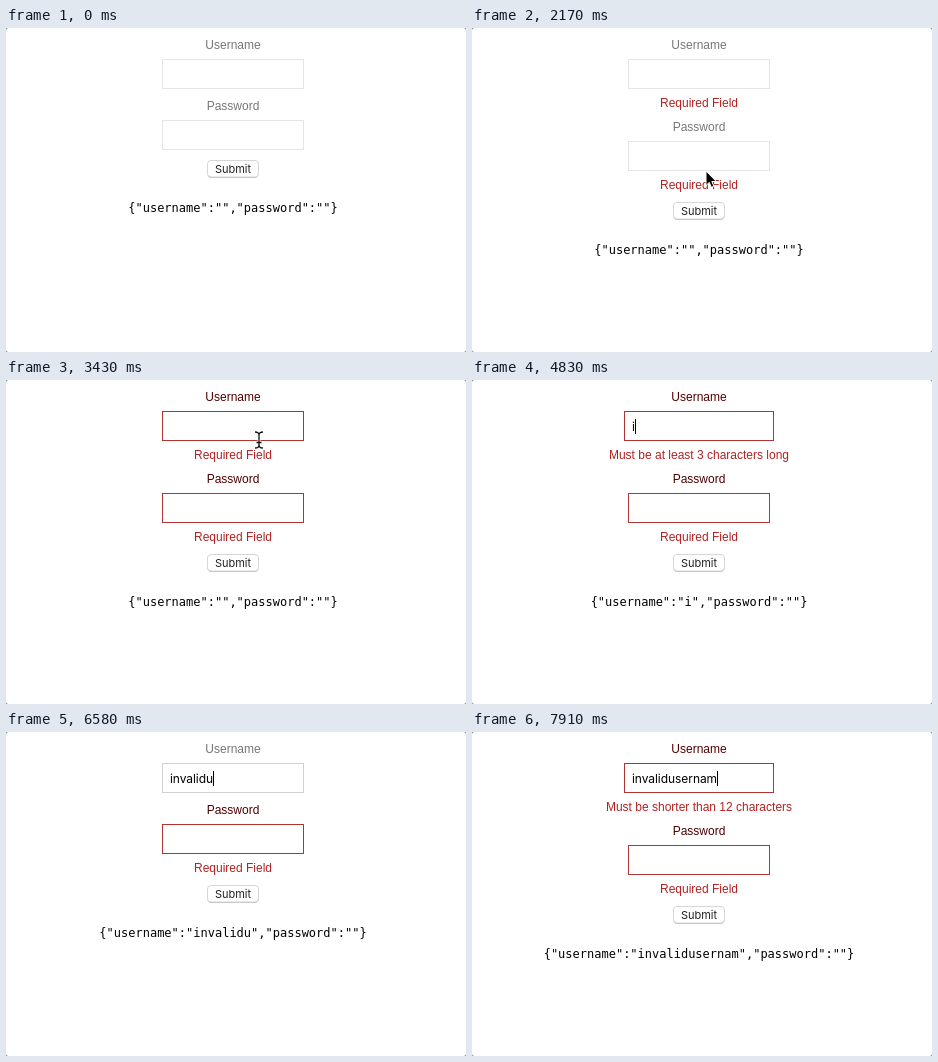
An HTML page for the animation above (8000 ms loop, 460 by 324 pixels).

```html
<!DOCTYPE html>
<html lang="en">
<head>
<meta charset="utf-8">
<title>Form validation</title>
<style>
  html, body { margin: 0; width: 100%; height: 100%; overflow: hidden; background: #777; }
  svg { display: block; width: 460px; height: 324px; }
  text { font: 12px "Liberation Sans", Arial, sans-serif; text-anchor: middle; white-space: pre; }
  .error { fill: #b22222; }
  .json { font-family: "DejaVu Sans Mono", monospace; fill: #000; }
  .value { font-family: Inter, sans-serif; letter-spacing: -.06px; text-anchor: start; fill: #000; }
  .button { font: 11px Inter, sans-serif; fill: #222; }
  .box { fill: #fff; shape-rendering: crispEdges; }
</style>
</head>
<body>
<svg viewBox="0 0 460 324">
  <rect width="460" height="324" rx="2.5" fill="#fff"/>
  <g id="user">
    <text class="label" x="227" y="21">Username</text>
    <rect class="box" x="156.5" y="31.5" width="141" height="29"/>
    <text class="error" x="227" y="79"></text>
    <text class="value" y="51"></text>
    <rect id="caret" y="39" width="1" height="15"/>
  </g>
  <g id="pass">
    <text class="label" x="227" y="82">Password</text>
    <rect class="box" x="156.5" y="92.5" width="141" height="29"/>
    <text class="error" x="227" y="140">Required Field</text>
  </g>
  <g id="foot">
    <rect x="201.5" y="133" width="51" height="17" rx="4" fill="#bbb"/>
    <rect x="201.5" y="132.5" width="51" height="16.5" rx="3.5" fill="#fff" stroke="#d6d6d6"/>
    <text class="button" x="227" y="145">Submit</text>
    <text class="json" x="227" y="184"></text>
  </g>
  <g id="pointer">
    <path id="arrow" d="M0 0V14.5L3.3 11.4L5.4 16.3L7.9 15.2L5.8 10.5H10.3Z" stroke="#fff" stroke-width="1"/>
    <g id="beam" fill="none">
      <path id="beamShape" d="M-4-8Q0-8 0-5V5Q0 8-4 8M4-8Q0-8 0-5M0 5Q0 8 4 8M-2.5 2.5H2.5" stroke="#fff" stroke-width="2.6"/>
      <use href="#beamShape"/>
      <path d="M-4-8Q0-8 0-5V5Q0 8-4 8M4-8Q0-8 0-5M0 5Q0 8 4 8M-2.5 2.5H2.5" stroke="#111" stroke-width="1.3"/>
    </g>
  </g>
</svg>
<script>
const LOOP = 8000, ROW = 21, FADE = 200;
const SUBMIT = 2170, FOCUS = 3920, VALID = 5320, TOO_LONG = 7630;
const NAME = 'invalidusernam';
const KEYS = [4760, 5040, 5320, 5740, 6020, 6300, 6440, 6580, 6720, 7140, 7560, 7630, 7770, 7910];
// time, x, y
const PATH = [[560, 246, 296], [1260, 234, 143], [2660, 234, 143],
              [3430, 253, 60], [3500, 254.5, 59.5], [3640, 258.5, 54]];
const GREY = [119, 119, 119], MAROON = [80, 0, 0], RED = [176, 52, 52];
const IDLE = [229, 229, 229], FOCUSED = [208, 208, 208];

const $ = s => document.querySelector(s);
const field = id => ({
  label: $(`#${id} .label`), box: $(`#${id} .box`), error: $(`#${id} .error`)
});
const user = field('user'), pass = field('pass');
const value = $('.value'), caret = $('#caret'), json = $('.json');
const pointer = $('#pointer'), arrow = $('#arrow'), beam = $('#beam');

const clamp = v => Math.max(0, Math.min(1, v));
const ease = v => v * v * (3 - 2 * v);
const lerp = (a, b, k) => a + (b - a) * k;
const mix = (a, b, k) => `rgb(${a.map((v, i) => Math.round(lerp(v, b[i], k)))})`;
const fade = (t, start) => ease(clamp((t - start) / FADE));
const show = (el, on) => el.setAttribute('visibility', on ? 'inherit' : 'hidden');
const shift = (el, x, y) => el.setAttribute('transform', `translate(${x} ${y})`);

function paint({ label, box }, level, idle) {
  label.setAttribute('fill', mix(GREY, MAROON, level));
  box.setAttribute('stroke', mix(idle, RED, level));
}

function pointerAt(t) {
  let i = 0;
  while (i < PATH.length - 2 && t >= PATH[i + 1][0]) i++;
  const [a, b] = [PATH[i], PATH[i + 1]];
  const k = ease(clamp((t - a[0]) / (b[0] - a[0])));
  return [lerp(a[1], b[1], k), lerp(a[2], b[2], k)];
}

function drawPointer(t) {
  const on = t >= PATH[0][0] && t < KEYS[0];
  show(pointer, on);
  if (!on) return;
  const [x, y] = pointerAt(t);
  const overText = t > SUBMIT && (y < 61 || (y > 68 && y < 82) || (y > 113 && y < 142.5));
  shift(pointer, x, y);
  show(arrow, !overText);
  show(beam, overText);
}

function draw(t) {
  const typed = NAME.slice(0, KEYS.filter(k => t >= k).length);
  const passBad = t >= SUBMIT;
  const userBad = passBad && (t < VALID || t >= TOO_LONG);
  const wide = userBad && typed ? 4 : 0;

  const level = t < VALID ? fade(t, SUBMIT) : t < TOO_LONG ? 1 - fade(t, VALID) : fade(t, TOO_LONG);
  paint(user, level, t < FOCUS ? IDLE : FOCUSED);
  paint(pass, fade(t, SUBMIT), IDLE);

  user.box.setAttribute('x', 156.5 - wide);
  user.box.setAttribute('width', 141 + 2 * wide);
  user.error.textContent = !typed ? 'Required Field'
    : t < VALID ? 'Must be at least 3 characters long' : 'Must be shorter than 12 characters';
  show(user.error, userBad);
  show(pass.error, passBad);

  value.textContent = typed;
  value.setAttribute('x', 164 - wide);
  const end = typed ? value.getComputedTextLength() : 0;
  caret.setAttribute('x', Math.round(164 - wide + end));
  show(caret, typed || (t >= FOCUS && t < FOCUS + 560));

  json.textContent = `{"username":"${typed}","password":""}`;
  shift($('#pass'), 0, userBad * ROW);
  shift($('#foot'), 0, (userBad + passBad) * ROW);
  drawPointer(t);
}

function tick() {
  draw(performance.now() % LOOP);
  requestAnimationFrame(tick);
}
tick();
</script>
</body>
</html>
```
